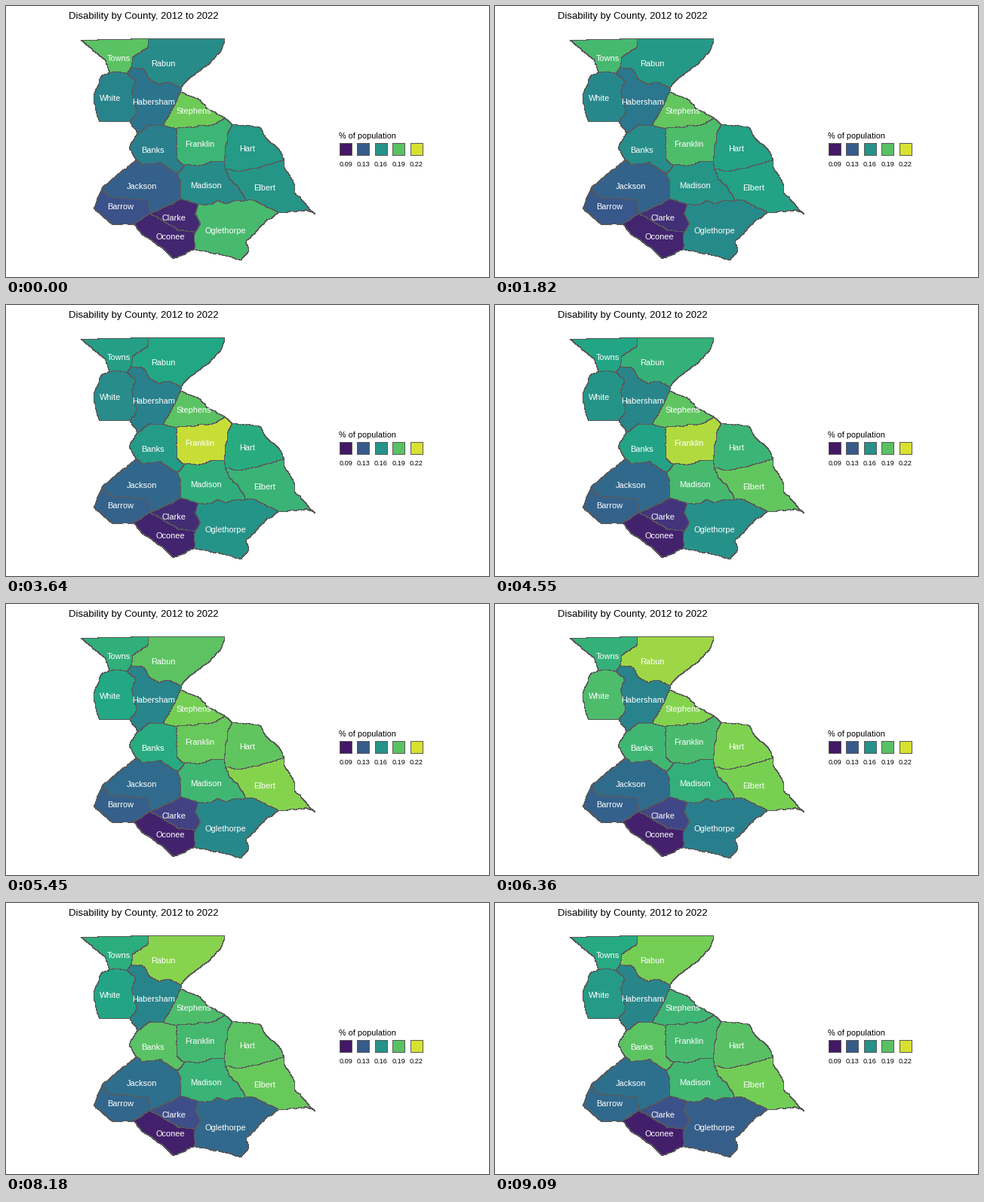
A matplotlib script that plays this animation: 640x360 px, repeating every 10 s.

```python
import numpy as np
import matplotlib.pyplot as plt
from matplotlib.animation import FuncAnimation
from matplotlib.colors import LinearSegmentedColormap
from matplotlib.patches import Polygon, Rectangle

W, H, DPI = 640, 360, 100
LOOP, FRAMES, YEARS = 10000, 200, 11
PX = 72 / DPI

plt.rcParams["font.family"] = "Liberation Sans"
rng = np.random.default_rng(7)
fill = LinearSegmentedColormap.from_list(
    "fill", ["#440154", "#414487", "#2A788E", "#22A884", "#7AD151", "#FDE725"], N=512)

# Points where borders meet or turn sharply
NODES = {
    "A": (188, 43), "B": (165, 82), "C": (160, 89), "D": (137, 88), "E": (164, 153),
    "F": (174, 169), "G": (208, 158), "H": (232, 108), "I": (231, 114), "J": (225, 162),
    "K": (289, 148), "L": (299, 157), "M": (289, 206), "N": (236, 211), "O": (227, 222),
    "P": (172, 204), "Q": (290, 216), "R": (368, 204), "S": (317, 258), "T": (361, 274),
    "U": (231, 256), "V": (254, 263), "W": (191, 275), "X": (127, 241), "Y": (168, 289),
    "Z": (250, 300), "a": (249, 323), "b": (99, 45), "c": (289, 43), "d": (123, 153),
    "e": (409, 276), "f": (311, 337), "g": (221, 335),
}

# Bends on the way between two nodes; other borders run straight
BENDS = {
    "AB": [(188, 54), (167, 68)],
    "BH": [(181, 83), (190, 97), (203, 104), (215, 101)],
    "CE": [(171, 99), (166, 113), (173, 141)],
    "CD": [(147, 87)],
    "Db": [(130, 70)],
    "cH": [(284, 59), (272, 73), (258, 85), (241, 96)],
    "Dd": [(127, 91), (115, 120)],
    "FG": [(190, 157)],
    "GI": [(216, 143)],
    "IK": [(256, 125), (266, 135)],
    "JK": [(276, 157)],
    "JN": [(226, 188), (226, 205)],
    "LM": [(293, 168)],
    "NM": [(260, 211), (272, 206)],
    "LR": [(336, 160), (344, 176), (360, 188)],
    "QR": [(309, 219), (333, 214)],
    "QS": [(295, 230), (308, 240)],
    "Re": [(368, 214), (381, 234), (383, 249)],
    "eT": [(399, 271)],
    "PO": [(180, 210), (205, 208)],
    "OU": [(231, 231)],
    "VS": [(270, 264), (280, 258), (291, 262), (301, 258)],
    "ST": [(327, 257)],
    "UW": [(212, 266)],
    "XW": [(136, 253), (186, 258)],
    "WZ": [(228, 297)],
    "VZ": [(250, 275), (257, 290)],
    "Tf": [(343, 286), (317, 314), (323, 322)],
    "fa": [(290, 331)],
    "gY": [(207, 321), (180, 303)],
    "YX": [(140, 290), (116, 268)],
    "FP": [(162, 187)],
}
SMOOTH = "bA Ac dE"

# Label centre, ring of nodes, and rate: first, last, bump, bump year
COUNTIES = {
    "Towns": (149, 69, "bABCD", .73, .61, -.12, 4),
    "Rabun": (208.5, 76, "AcHB", .48, .77, .19, 7.5),
    "White": (138.5, 122, "DCEd", .45, .53, .20, 7.3),
    "Habersham": (196, 127, "BHIGFEC", .38, .46, .04, 5),
    "Stephens": (249, 139, "IKJG", .77, .66, .12, 7),
    "Franklin": (256.5, 183, "JKLMN", .66, .68, .26, 4.3),
    "Hart": (320, 189, "LRQM", .54, .72, .14, 7),
    "Elbert": (342.5, 241, "QReTS", .52, .78, .14, 6),
    "Madison": (265, 238, "NMQSVUO", .48, .67, .11, 5),
    "Banks": (194, 191, "FGJNOP", .43, .72, .05, 8),
    "Jackson": (180, 239, "POUWX", .31, .37, 0, 0),
    "Barrow": (151.5, 266, "XWY", .25, .34, .03, 4),
    "Clarke": (222, 281, "UVZW", .12, .25, -.04, 4),
    "Oconee": (218, 306, "WZagY", .11, .09, 0, 0),
    "Oglethorpe": (290.5, 298, "VSTfaZ", .72, .30, -.16, 2),
}


def trace(points, amp, step=4):
    """Jitter a line between its ends and walk it pixel by pixel."""
    pts = np.array(points, float)
    dist = np.r_[0, np.cumsum(np.hypot(*np.diff(pts, axis=0).T))]
    s = np.linspace(0, dist[-1], max(2, int(dist[-1] / step)))
    line = np.column_stack([np.interp(s, dist, pts[:, k]) for k in (0, 1)])
    line[1:-1] += rng.uniform(-amp, amp, line[1:-1].shape)
    line = np.round(line)
    walk = []
    for p, q in zip(line, line[1:]):
        n = int(max(abs(q - p).max(), 1))
        walk.extend(np.round(p + (q - p) * np.arange(n)[:, None] / n))
    return np.array(walk + [line[-1]]) + 0.5


borders = {}


def border(p, q):
    if q + p in borders:
        return borders[q + p][::-1]
    bends = BENDS.get(p + q) or BENDS.get(q + p, [])[::-1]
    amp = 0.2 if p + q in SMOOTH else 0.8
    borders[p + q] = trace([NODES[p], *bends, NODES[q]], amp)
    return borders[p + q]


def ring(nodes):
    return np.vstack([border(p, q)[:-1] for p, q in zip(nodes, nodes[1:] + nodes[0])])


def rate(year, first, last, bump, peak):
    trend = first + (last - first) * year / (YEARS - 1)
    return trend + bump * np.exp(-((year - peak) / 1.6) ** 2)


fig = plt.figure(figsize=(W / DPI, H / DPI), dpi=DPI, facecolor="white")
ax = fig.add_axes([0, 0, 1, 1])
ax.set(xlim=(0, W), ylim=(H, 0))
ax.axis("off")


def text(x, y, s, px, color="black", ha="center"):
    ax.text(x, y, s, fontsize=px * PX, color=color, ha=ha, va="baseline", zorder=3)


edge = dict(edgecolor="#595959", linewidth=PX, antialiased=False, snap=False)
shapes = {}
for name, (x, y, nodes, *_) in COUNTIES.items():
    shapes[name] = ax.add_patch(Polygon(ring(nodes), **edge))
    text(x, y + 4, name, 11, "white")

text(83, 17, "Disability by County, 2012 to 2022", 13.1, ha="left")
text(441, 176, "% of population", 10.9, ha="left")
for i, label in enumerate(["0.09", "0.13", "0.16", "0.19", "0.22"]):
    x = 450 + 23.5 * i
    shade = fill(0.07 + 0.218 * i)
    ax.add_patch(Rectangle((int(x - 8) + 0.5, 182.5), 16, 16, facecolor=shade, **edge))
    text(x, 213, label, 9.2)


def update(frame):
    year = ((frame + 1) * YEARS - 1) // FRAMES
    for name, shape in shapes.items():
        shape.set_facecolor(fill(rate(year, *COUNTIES[name][3:])))
    return list(shapes.values())


anim = FuncAnimation(fig, update, frames=FRAMES, interval=LOOP // FRAMES,
                     repeat=True, repeat_delay=0, blit=False)
plt.show()
```
